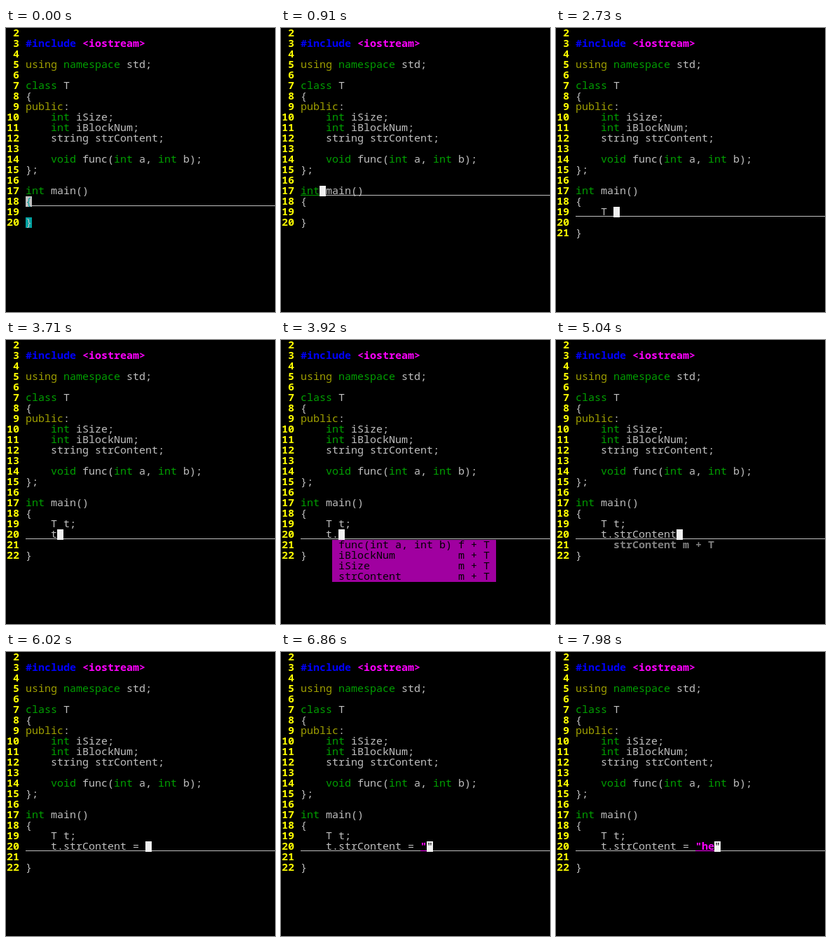
An HTML page with a canvas for the animation above (8 s loop, 384 px wide and 405 px high).

```html
<!DOCTYPE html>
<html>
<head>
<meta charset="utf-8">
<style>
html, body { margin: 0; width: 100%; height: 100%; overflow: hidden; background: #000; }
canvas { display: block; }
</style>
</head>
<body>
<canvas id="screen" width="384" height="405"></canvas>
<script>
const ctx = document.getElementById('screen').getContext('2d');
const W = 9, H = 15, CODE_X = 28, GUTTER_X = -8, FIRST = 2, ROWS = 27, LOOP = 8000;
const GREY = '#c0c0c0', GREEN = '#00a000', OLIVE = '#a0a000', CYAN = '#00a0a0',
  PURPLE = '#a000a0', BLUE = '#0000ff', YELLOW = '#ffff00', PINK = '#ff00ff',
  WHITE = '#f0f0f0', DIM = '#808080';
const BOLD = [BLUE, YELLOW, PINK, DIM];

const head = ['', '#include <iostream>', '', 'using namespace std;', '', 'class T', '{', 'public:',
  '    int iSize;', '    int iBlockNum;', '    string strContent;', '',
  '    void func(int a, int b);', '};', '', 'int main()', '{'];
const tail = ['', '}'];

const members = [['func(int a, int b)', 'f'], ['iBlockNum', 'm'], ['iSize', 'm'], ['strContent', 'm']];

const syntax = [
  [/^#include/, BLUE],
  [/^<\w+>/, PINK],
  [/^"[^"]*"?/, PINK],
  [/^(using|public)\b/, OLIVE],
  [/^(namespace|class|int|void)\b/, GREEN],
  [/^\w+/, GREY],
  [/^[^]/, GREY]
];

// Editor state after typing the given lines below the opening brace
const type = (...added) => ({
  added, on: true, line: 18 + added.length, col: added[added.length - 1].length
});
const blink = on => ({ on });
const decl = '    T t;', assign = '    t.strContent';

const home = { line: 18, col: 0, on: true, added: [], menu: null, selected: false };
const steps = [
  [0, home],
  [630, blink(false)],
  [910, { line: 17, col: 3, on: true }],
  [1330, home],
  [1610, blink(false)],
  [1820, type('    ')],
  [2100, type('    T')],
  [2590, blink(false)],
  [2730, type('    T ')],
  [2940, type('    T t')],
  [3010, type(decl)],
  [3290, type(decl, '    ')],
  [3640, blink(false)],
  [3710, type(decl, '    t')],
  [3920, { ...type(decl, '    t.'), menu: '' }],
  [4410, { ...type(decl, '    t.s'), menu: 's' }],
  [4480, blink(false)],
  [4900, blink(true)],
  [5040, { ...type(decl, assign), selected: true }],
  [5390, blink(false)],
  [5880, { ...type(decl, assign + ' '), menu: null, selected: false }],
  [5950, type(decl, assign + ' =')],
  [6020, type(decl, assign + ' = ')],
  [6370, blink(false)],
  [6440, type(decl, assign + ' = "')],
  [6510, type(decl, assign + ' = ""')],
  [6860, { col: 20, on: true }],
  [7280, blink(false)],
  [7770, blink(true)],
  [7910, { ...type(decl, assign + ' = "h"'), col: 21 }],
  [7980, { ...type(decl, assign + ' = "he"'), col: 22 }]
];

function box(x, y, w, h, color) {
  ctx.fillStyle = color;
  ctx.fillRect(x, y, w, h);
}

function print(text, x, y, color) {
  ctx.font = (BOLD.includes(color) ? 'bold ' : '') + '15px "Noto Sans Mono", monospace';
  ctx.fillStyle = color;
  [...text].forEach((ch, i) => ch !== ' ' && ctx.fillText(ch, x + i * W, y + 12));
}

function printCode(text, y, underlined) {
  let x = CODE_X;
  while (text) {
    const [rule, color] = syntax.find(([re]) => re.test(text));
    const word = text.match(rule)[0];
    print(word, x, y, color);
    if (underlined) box(x, y + 13, word.length * W, 1, color);
    x += word.length * W;
    text = text.slice(word.length);
  }
  if (underlined) box(x, y + 13, 384 - x, 1, GREY);
}

function drawMenu({ menu, selected }, y) {
  const items = members.filter(([name]) => name.startsWith(menu));
  const width = Math.max(...items.map(([name]) => name.length));
  const x = CODE_X + 5 * W;
  items.forEach(([name, kind], i) => {
    const row = ` ${name.padEnd(width)} ${kind} + T `;
    box(x, y + i * H, row.length * W, H, selected ? '#000' : PURPLE);
    print(row, x, y + i * H, selected ? DIM : '#000');
  });
}

function drawCell(ch, x, y, back, color) {
  box(x, y, W, H, back);
  print(ch, x, y, color);
}

function draw(s) {
  const lines = [...head, ...s.added, ...tail];
  const top = line => (line - FIRST) * H;
  box(0, 0, 384, 405, '#000');
  for (let r = 0; r < ROWS; r++) {
    if (r >= lines.length) {
      print('~', GUTTER_X, r * H, BLUE);
      continue;
    }
    print(String(r + FIRST).padStart(3), GUTTER_X, r * H, YELLOW);
    printCode(lines[r], r * H, r + FIRST === s.line);
  }
  const matched = s.line === 18;
  if (matched) {
    drawCell('{', CODE_X, top(18), CYAN, GREY);
    drawCell('}', CODE_X, top(20), CYAN, GREY);
  }
  if (s.menu !== null) drawMenu(s, top(s.line + 1));
  if (s.on) {
    const under = lines[s.line - FIRST][s.col] || ' ';
    drawCell(under, CODE_X + s.col * W, top(s.line), matched ? GREY : WHITE, matched ? CYAN : '#000');
  }
}

let state = {};
const states = steps.map(([at, change]) => [at, state = { ...state, ...change }]);
const start = performance.now();
let shown;

function tick() {
  const t = (performance.now() - start) % LOOP;
  const now = states.filter(([at]) => at <= t).pop()[1];
  if (now !== shown) draw(shown = now);
  requestAnimationFrame(tick);
}
tick();
</script>
</body>
</html>
```
